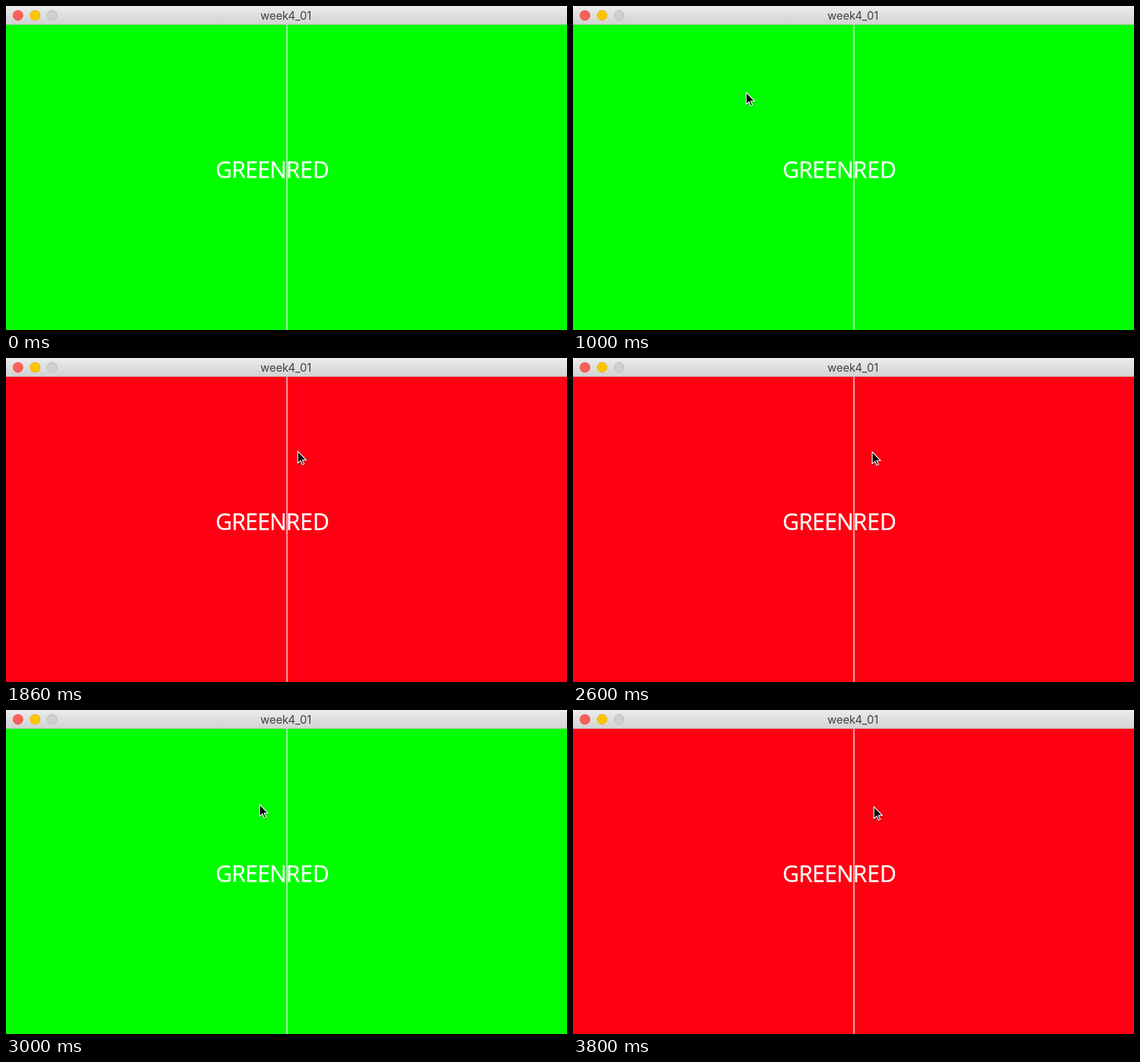
These frames come from a looping animation (984x569 px, 4.96 s). An HTML page:

```html
<!DOCTYPE html>
<html lang="en">
<head>
<meta charset="utf-8">
<title>week4_01</title>
<style>
  html, body { margin: 0; width: 100%; height: 100%; overflow: hidden; background: #fff; }
  svg { display: block; width: 984px; height: 569px; }
  .title { font: 19.6px Inter, Roboto, sans-serif; fill: #404040; text-anchor: middle; }
  .label { font: 40px "Open Sans", "Noto Sans", sans-serif; fill: #fff; stroke: #fff; stroke-width: .4; }
</style>
</head>
<body>
<svg viewBox="0 0 984 569">
  <defs>
    <linearGradient id="bar" x2="0" y2="1">
      <stop offset="0" stop-color="#ececec"/>
      <stop offset="1" stop-color="#d2d2d2"/>
    </linearGradient>
    <path id="arrow" d="M.8 1.8V22.6L5.8 18.2 9.2 25.6 12 24.4 8.8 17.2H15.6Z"/>
  </defs>

  <path d="M0 33V7Q0 0 7 0H977Q984 0 984 7V33Z" fill="url(#bar)"/>
  <path d="M6 .5H978" stroke="#f4f4f4"/>
  <path d="M0 32.5H984" stroke="#bcbcbc"/>
  <circle cx="21" cy="16.5" r="8.7" fill="#fc605b" stroke="#e24b46"/>
  <circle cx="51" cy="16.5" r="8.7" fill="#fdc500" stroke="#dfaa1a"/>
  <circle cx="81" cy="16.5" r="8.7" fill="#d0d0d0" stroke="#b9b9b9"/>
  <text class="title" x="491" y="24">week4_01</text>

  <rect id="canvas" y="33" width="984" height="536"/>
  <rect x="492" y="33" width="1.5" height="536" fill="#fff"/>
  <text class="label" x="367.5" y="301.5" letter-spacing="-.9">GREEN</text>
  <text class="label" x="491" y="301.5">RED</text>

  <g id="cursor" stroke-linejoin="round">
    <use href="#arrow" x=".6" y="1.4" stroke="#000" stroke-width="1.8" opacity=".25"/>
    <use href="#arrow" fill="#000" stroke="#fff" stroke-width="1.4"/>
  </g>
</svg>
<script>
  const LOOP = 4960, STEP = 100 / 3, APPEAR = 60;
  const MIDDLE = 490, LAG = 80;
  const canvas = document.getElementById('canvas');
  const cursor = document.getElementById('cursor');

  // Eased pointer moves, each from where the last one ended; bow delays the vertical part
  const entry = { x: -33, y: -165 };
  const moves = [
    { from: -240, to: 360, x: 211, y: 149 },
    { from: 700, to: 1290, x: 391, y: 159, bow: 3 },
    { from: 1290, to: 1750, x: 489, y: 162 },
    { from: 1750, to: 1990, x: 539, y: 163 },
    { from: 2450, to: 3045, x: 442, y: 164 },
    { from: 3340, to: 3795, x: 527, y: 168, bow: 2 }
  ];

  const clamp = u => Math.min(1, Math.max(0, u));
  const ease = u => u * u * (3 - 2 * u);

  function pointer(t) {
    let { x, y } = entry;
    for (const m of moves) {
      const e = ease(clamp((t - m.from) / (m.to - m.from)));
      x += (m.x - x) * e;
      y += (m.y - y) * e ** (m.bow ?? 1);
    }
    return { x: Math.round(x), y: Math.round(y) };
  }

  // The sketch paints by side, and leaves its black ground exactly in the middle
  function sideColour(x) {
    if (x < MIDDLE) return '#00ff00';
    return x > MIDDLE ? '#ff0013' : '#000';
  }

  // 30 steps a second, each starting on a multiple of 10 ms
  function quantize(ms) {
    const n = Math.floor((Math.floor(ms / 10) * 10 + 9.99) / STEP);
    return Math.floor(n * STEP / 10 + 1e-6) * 10;
  }

  function draw(ms) {
    const t = quantize(ms % LOOP);
    const { x, y } = pointer(t);
    canvas.setAttribute('fill', sideColour(pointer(t - LAG).x));
    cursor.setAttribute('visibility', t < APPEAR ? 'hidden' : 'visible');
    cursor.setAttribute('transform', `translate(${x} ${y})`);
  }

  let start;
  function tick(now) {
    start ??= now;
    draw(now - start);
    requestAnimationFrame(tick);
  }
  draw(0);
  requestAnimationFrame(tick);
</script>
</body>
</html>
```
